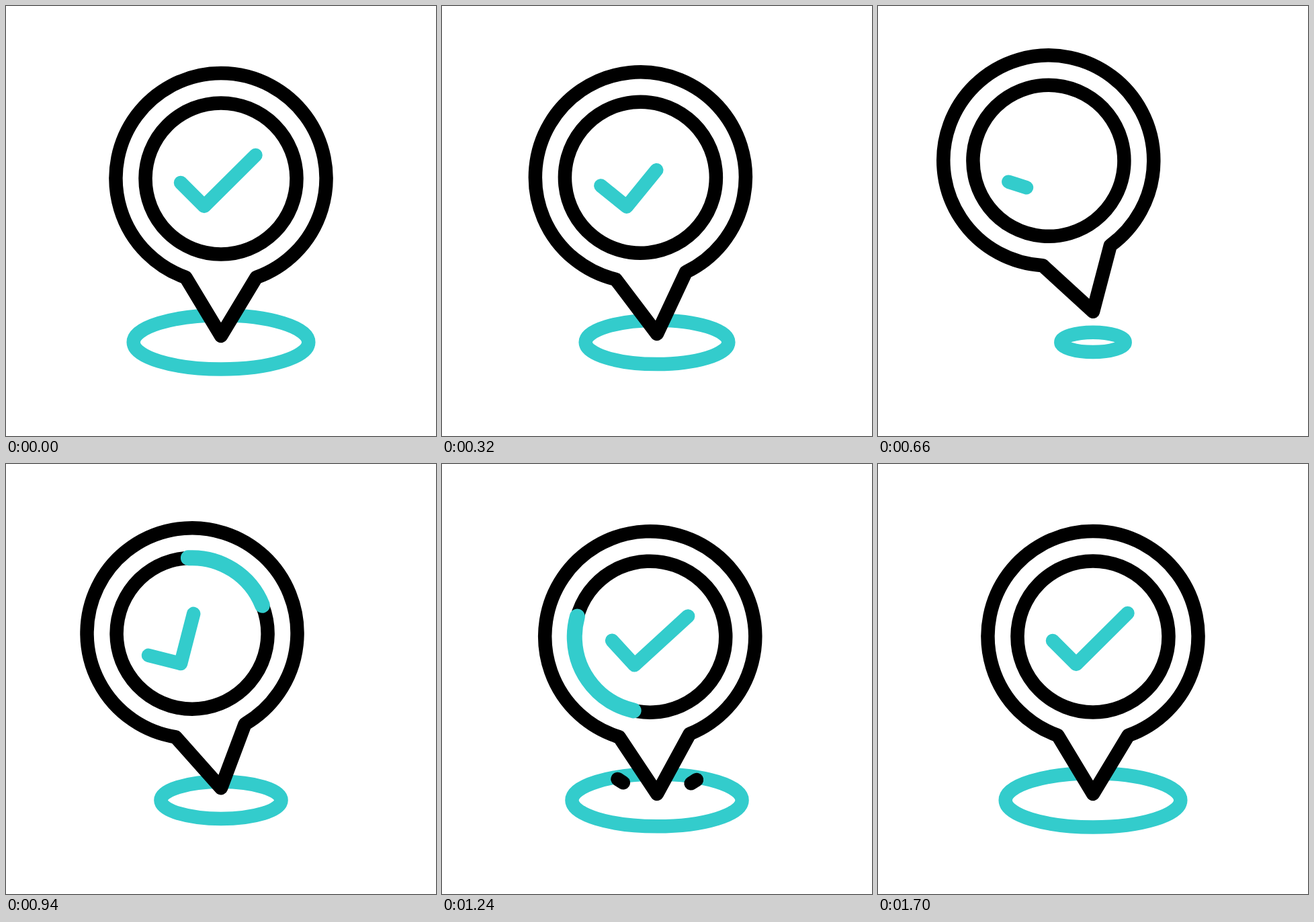
Animation of 640x640 px, one loop 3000 ms. Source, as an HTML page:

```html
<!DOCTYPE html>
<html lang="en">
<head>
<meta charset="utf-8">
<title>Location confirmed</title>
<style>
  html, body { margin: 0; width: 100%; height: 100%; overflow: hidden; background: #fff; }
  svg { display: block; width: 100%; height: 100%; }
  svg * { fill: none; stroke: #000; stroke-width: 20.5; stroke-linecap: round; stroke-linejoin: round; }
  svg .teal { stroke: #33cccc; }
  #arc { stroke-width: 23; }
  #body { fill: #fff; }
</style>
</head>
<body>
<svg viewBox="0 0 640 640">
  <ellipse id="ring" class="teal" cx="320" cy="500.4"/>
  <path class="spark" pathLength="1" d="M299 493L261.5 469"/>
  <path class="spark" pathLength="1" d="M341 494L379 470"/>
  <g id="pin">
    <path id="body" d="M267.5 404A156.5 156.5 0 1 1 372.5 404L320 491Z"/>
    <circle cx="320" cy="257" r="112.5"/>
    <circle id="arc" class="teal" cx="320" cy="257" r="112.5" pathLength="1" transform="rotate(-90 320 257)"/>
    <path id="check" class="teal" pathLength="1" d="M260 263L295 298L371.5 222"/>
  </g>
</svg>
<script>
  const LOOP = 3000;
  const $ = id => document.getElementById(id);
  const ring = $('ring'), pin = $('pin'), arc = $('arc'), check = $('check');
  const sparks = document.querySelectorAll('.spark');

  const progress = (t, from, to) => Math.min(1, Math.max(0, (t - from) / (to - from)));
  const smooth = x => x * x * (3 - 2 * x);
  const easeOut = x => 1 - (1 - x) ** 2;
  const rise = x => x ** 1.25;

  // Bezier (1/3, 0, 0.47, 1), solved for its parameter by bisection
  function glide(x) {
    if (x <= 0 || x >= 1) return x;
    let lo = 0, hi = 1;
    for (let i = 0; i < 24; i++) {
      const s = (lo + hi) / 2, r = 1 - s;
      if (s * r * r + 1.41 * s * s * r + s ** 3 < x) lo = s; else hi = s;
    }
    return smooth(hi);
  }

  // Keys are [time, value, easing into this key]
  function track(t, keys) {
    const i = keys.findIndex(key => key[0] > t);
    if (i === 0) return keys[0][1];
    if (i < 0) return keys[keys.length - 1][1];
    const [t0, v0] = keys[i - 1], [t1, v1, ease = smooth] = keys[i];
    return v0 + (v1 - v0) * ease(progress(t, t0, t1));
  }

  const swing = [[0, 0], [846, -18.7], [1080, 3.85], [1200, -3.35], [1340, 0.7], [1500, 0]];
  const spread = [[120, 1], [665, 0.36, rise], [840, 0.35], [1062, 1.13], [1180, 0.92], [1300, 1.02], [1390, 1]];
  const checkTurn = [[400, 0], [910, -21], [1195, 5], [1700, 0]];
  const checkDrawn = [[120, 1], [665, 0.17, rise], [750, 0.17], [1030, 1]];

  function trim(el, start, end) {
    const visible = end > 0 && start < 1;
    el.style.display = visible ? '' : 'none';
    if (!visible) return;
    el.setAttribute('stroke-dasharray', `${Math.max(end - start, 0.0005)} 4`);
    el.setAttribute('stroke-dashoffset', -start);
  }

  function draw(t) {
    const scale = track(t, spread);
    ring.setAttribute('rx', 130.3 * scale);
    ring.setAttribute('ry', 40.1 * scale);

    const lift = 90 * Math.max(0, 1 - scale) ** 2;
    pin.setAttribute('transform', `translate(0 ${-lift}) rotate(${track(t, swing)} 320 491)`);

    check.setAttribute('transform', `rotate(${track(t, checkTurn)} 295 298)`);
    trim(check, 0, track(t, checkDrawn));

    trim(arc, glide(progress(t, 873, 1690)), glide(progress(t, 722, 1550)));
    sparks.forEach(spark => trim(spark,
      easeOut(progress(t, 1040, 1420)), easeOut(progress(t, 1020, 1225))));
  }

  const begin = performance.now();
  function tick() {
    draw((performance.now() - begin) % LOOP);
    requestAnimationFrame(tick);
  }
  tick();
</script>
</body>
</html>
```
